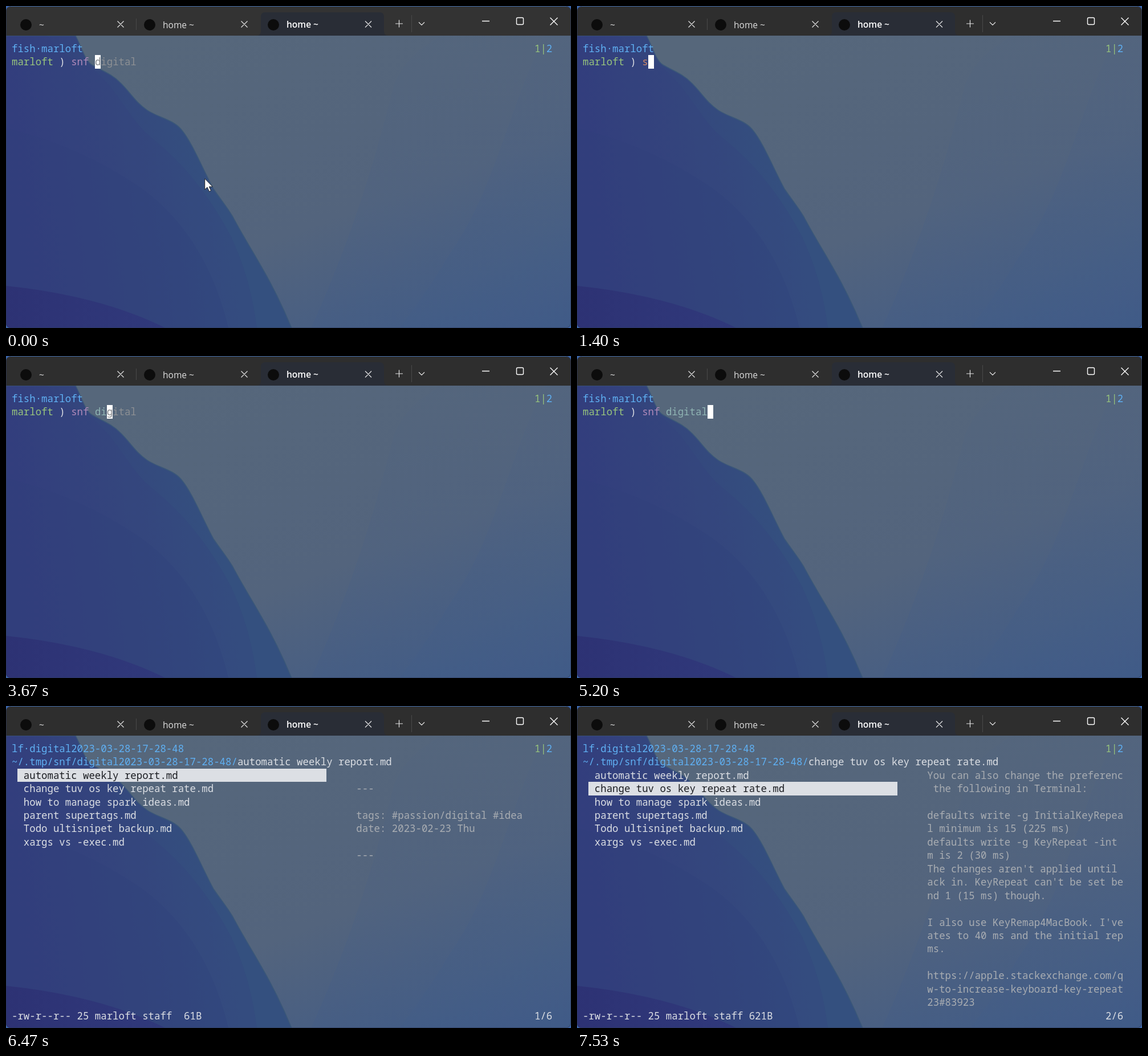
Recreate the animation shown at these times as an HTML page. Size 991 by 565 pixels, loop 8 s.

```html
<!DOCTYPE html>
<html lang="en">
<head>
<meta charset="utf-8">
<title>Terminal</title>
<style>
html, body { margin: 0; width: 991px; height: 565px; overflow: hidden; background: #3c68ad; }
svg { position: absolute; left: 0; top: 0; }
svg text { font: 15.5px "Open Sans", "Noto Sans", sans-serif; fill: #dedede; }
.icon { fill: none; stroke: #e4e4e4; stroke-width: 1.2; }
#screen span {
  position: absolute; white-space: pre; color: #dcdfe4;
  font: 17.367px/23.45px "Noto Sans Mono", "DejaVu Sans Mono", monospace;
}
#screen .blue { color: #5fb0f3; }
#screen .green { color: #98c57c; }
#screen .cmd { color: #b18aba; }
#screen .bad { color: #cf8868; }
#screen .arg { color: #8fb4b3; }
#screen .hint { color: #8d9094; }
#screen .dim { color: #a9adb2; }
#screen .cursor { color: #85888c; background: #fff; }
#screen .sel { color: #1b1d22; background: #dcdfe4; }
</style>
</head>
<body>
<svg width="991" height="565" viewBox="0 0 991 565">
  <defs>
    <linearGradient id="sky" x1=".3" y1="0" x2="1" y2="1">
      <stop offset="0" stop-color="#56677b"/><stop offset=".55" stop-color="#53647d"/><stop offset="1" stop-color="#3f5a87"/>
    </linearGradient>
    <linearGradient id="hill" gradientUnits="userSpaceOnUse" x1="0" y1="330" x2="370" y2="270">
      <stop offset="0" stop-color="#323d7d"/><stop offset=".55" stop-color="#34477d"/><stop offset="1" stop-color="#34507f"/>
    </linearGradient>
    <linearGradient id="low">
      <stop offset="0" stop-color="#2d3274"/><stop offset="1" stop-color="#30397b"/>
    </linearGradient>
    <linearGradient id="fold" x1="0" y1="0" x2="0" y2="1">
      <stop offset="0" stop-color="#4c6284" stop-opacity=".2"/><stop offset="1" stop-color="#415c88" stop-opacity=".6"/>
    </linearGradient>
    <clipPath id="win"><rect y="1" width="991" height="564" rx="8"/></clipPath>
  </defs>
  <g clip-path="url(#win)">
    <path d="M0 52H991V565H0Z" fill="url(#sky)"/>
    <path d="M765 52Q700 85 680 140C650 260 610 400 535 565H991V52Z" fill="url(#fold)" opacity=".45"/>
    <path d="M945 52C880 180 860 320 775 440Q740 500 690 565H991V52Z" fill="url(#fold)" opacity=".6"/>
    <path id="ridge" d="M0 52H122C133 72 138 96 152 104C172 115 186 120 200 134C218 151 226 168 248 183C268 196 292 199 307 216C326 238 344 284 364 321C377 340 386 350 398 370C418 408 444 448 465 488Q484 524 501 565H0Z" fill="url(#hill)" stroke="#3b5878" stroke-width="1.5"/>
    <path d="M0 52H72Q100 90 152 110C200 150 215 200 260 235Q340 300 395 405Q430 480 440 565H0Z" fill="#323e7c" opacity=".2"/>
    <path d="M0 214Q130 246 235 318Q350 400 390 565H0Z" fill="#31407c" opacity=".3"/>
    <path d="M0 491Q165 508 280 565H0Z" fill="url(#low)"/>
    <path id="bar" d="M0 0H991V52H0Z"/>
    <path d="M439 52Q447 52 447 44V19Q447 11 455 11H655Q663 11 663 19V44Q663 52 671 52Z" fill="#292d36"/>
    <path d="M228.500 22V42M711.500 16V46" stroke="#494949"/>
    <g fill="#0c0c0c">
      <circle cx="35" cy="33" r="10"/><circle cx="252" cy="33" r="10"/><circle cx="469" cy="33" r="10"/>
    </g>
    <text x="58" y="39">~</text>
    <text x="275" y="39">home ~</text>
    <text x="492" y="38" style="fill:#fff;font-weight:600">home ~</text>
    <path class="icon" d="M195.500 26.500l11 11m0-11l-11 11M412.500 26.500l11 11m0-11l-11 11M630 26.500l11 11m0-11l-11 11M683 31h13M689.500 24.500v13M724 28.500l5 5 5-5"/>
    <path class="icon" style="stroke:#fff;stroke-width:1.400" d="M835 26.500h13M954.500 20.500l13 13m0-13l-13 13"/>
    <rect class="icon" style="stroke:#fff;stroke-width:1.400" x="895.500" y="20.500" width="12" height="12" rx="2"/>
  </g>
  <rect x=".5" y=".5" width="990" height="564" rx="8" fill="none" stroke="#2c3a5c" stroke-opacity=".6"/>
  <path d="M8 .5H983" stroke="#4069a6"/>
</svg>
<div id="screen"></div>
<svg width="991" height="565"><path id="mouse" d="M.7 1V20L5 16 8.500 23.500 11.500 22 8.300 15H14.300Z" fill="#fff" stroke="#222" stroke-width="1"/></svg>
<script>
const el = id => document.getElementById(id);
const CELL = 10.42, LINE = 23.45;
const USER = "marloft";
const DIR = "digital2023-03-28-17-28-48";
const COMMAND = "snf digital";
const FILES = ["automatic weekly report.md", "change tuv os key repeat rate.md", "how to manage spark ideas.md",
  "parent supertags.md", "Todo ultisnipet backup.md", "xargs vs -exec.md"];
const NOTES = [`
---

tags: #passion/digital #idea
date: 2023-02-23 Thu

---`,
`You can also change the preferenc
 the following in Terminal:

defaults write -g InitialKeyRepea
l minimum is 15 (225 ms)
defaults write -g KeyRepeat -int
m is 2 (30 ms)
The changes aren't applied until
ack in. KeyRepeat can't be set be
nd 1 (15 ms) though.

I also use KeyRemap4MacBook. I've
ates to 40 ms and the initial rep
ms.

https://apple.stackexchange.com/q
w-to-increase-keyboard-key-repeat
23#83923`];

// [time, typed length, suggestion shown]
const KEYS = [[0, 4, 1], [1070, 3, 0], [1270, 2, 0], [1400, 1, 0], [1600, 0, 0], [2000, 1, 1], [2200, 2, 1],
  [2400, 3, 1], [3000, 4, 1], [3670, 6, 1], [3730, 7, 1], [3870, 8, 1], [4000, 9, 1], [4330, 10, 1], [4930, 11, 1]];
// [time, x, y]
const MOUSE = [[0, 348, 302], [70, 322, 281], [130, 310, 271], [930, -50, -50]];

const at = (steps, t) => steps.findLast(s => s[0] <= t);

const put = (row, col, text, cls = "") =>
  `<span class="${cls}" style="left:${10 + col * CELL}px;top:${62.7 + row * LINE}px">${text}</span>`;

const header = title => put(0, 0, title, "blue") +
  put(0, 88, "1", "green") + put(0, 89, "|", "green") + put(0, 90, "2", "blue");

function prompt(t) {
  const [, n, hinted] = at(KEYS, t);
  const rest = hinted ? COMMAND.slice(n) : "";
  return header("fish·" + USER) + put(1, 0, USER, "green") + put(1, 8, ")") +
    put(1, 10, COMMAND.slice(0, Math.min(n, 3)), n === 1 ? "bad" : "cmd") +
    put(1, 14, COMMAND.slice(4, Math.max(n, 4)), "arg") +
    put(1, 11 + n, rest.slice(1), "hint") +
    put(1, 10 + n, rest[0] || " ", "cursor");
}

function browser(t) {
  const pick = t < 7470 ? 0 : 1;
  const path = `~/.tmp/snf/${DIR}/`;
  const list = FILES.map((name, i) => i === pick
    ? put(i + 2, 1, (" " + name).padEnd(52), "sel") : put(i + 2, 2, name));
  const loading = t >= 7470 && t < 7530;
  const note = loading ? put(2, 56, "loading...", "sel") : put(2, 58, NOTES[pick], "dim");
  return header((t < 6470 ? "fish·" : "lf·") + DIR) +
    put(1, 0, path, "blue") + put(1, path.length, FILES[pick]) + list.join("") + note +
    put(20, 0, `-rw-r--r-- 25 ${USER} staff ${pick ? "621B" : " 61B"}`) +
    put(20, 88, `${pick + 1}/6`);
}

let shown;
function draw() {
  const t = performance.now() % 8000;
  const html = t < 6000 ? prompt(t) : browser(t);
  if (html !== shown) el("screen").innerHTML = shown = html;
  const [, x, y] = at(MOUSE, t);
  el("mouse").setAttribute("transform", `translate(${x} ${y})`);
  el("bar").setAttribute("fill", t < 400 ? "#333333" : "#2e2e2e");
  requestAnimationFrame(draw);
}
draw();
</script>
</body>
</html>
```
